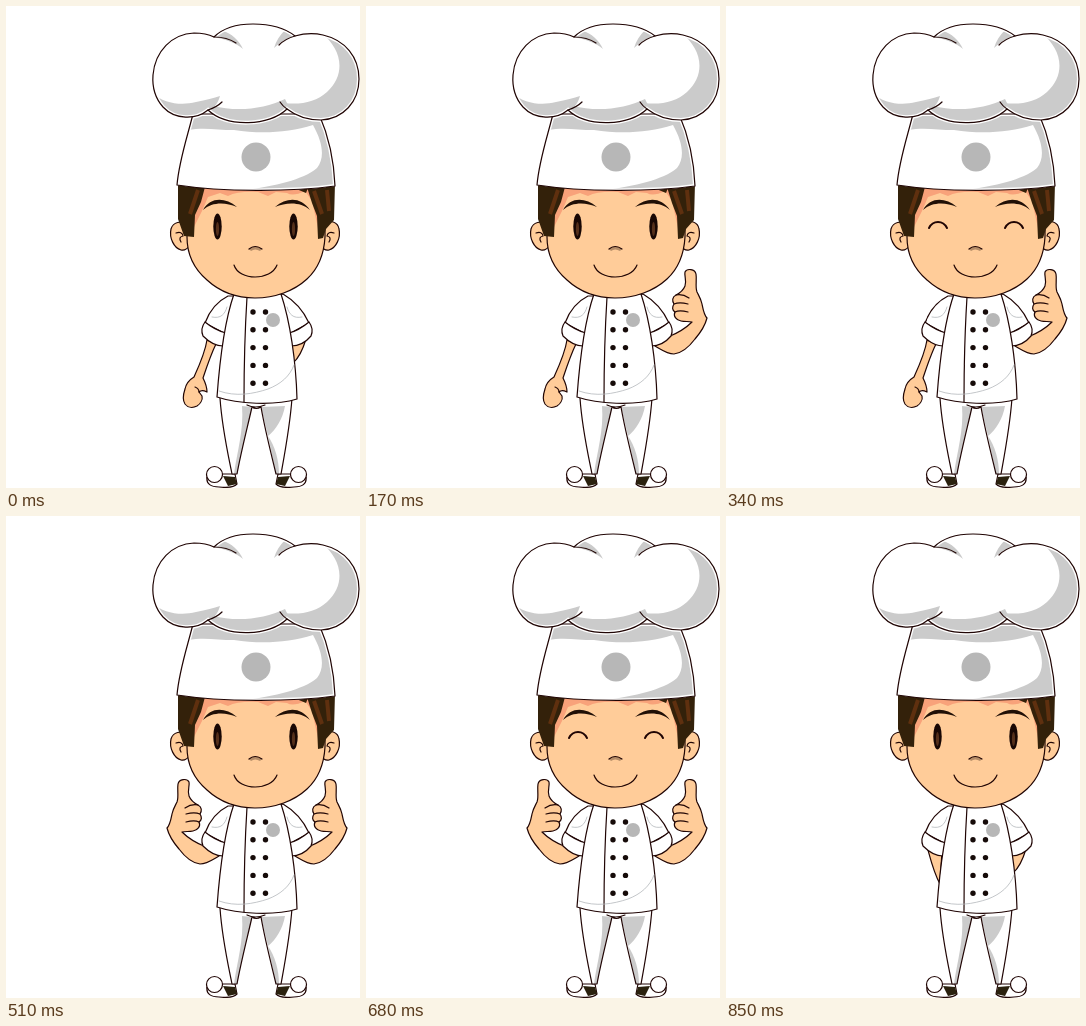
Animation of 354x482 px, one loop 1.02 s. Source, as an HTML page:

```html
<!DOCTYPE html>
<html lang="en">
<head>
<meta charset="utf-8">
<title>Thumbs-up chef</title>
<style>
  html, body { margin: 0; width: 100%; height: 100%; overflow: hidden; background: #fff; }
  svg { display: block; width: 354px; height: 482px; }
  .line { fill: none; stroke: #200504; stroke-width: 1.2; stroke-linecap: round; stroke-linejoin: round; }
  .white { fill: #fff; }
  .skin { fill: #ffcc99; }
  .shade { fill: #cbcbcb; }
  .rim { fill: none; stroke: #fff; stroke-width: 4; }
  .warm { fill: #f8a27a; }
  .hair { fill: #33210a; }
  .thin { stroke: #b4b8bb; stroke-width: .8; }
  .bold { stroke-width: 2; }
</style>
</head>
<body>
<svg viewBox="0 0 354 482" xmlns="http://www.w3.org/2000/svg">
  <defs>
    <path id="faceShape" d="M182 176 L181 231 C181 248 187 262 201 274 C213 285 230 292 249 292 C269 292 288 285 301 273 C313 262 318 248 319 231 L319 176 Z"/>
    <path id="bandShape" d="M187 108 C181 132 173 155 171 179 C216 186 285 186 329 180 C328 154 323 131 313 108 Z"/>
    <path id="puffShape" d="M202 104 C190 114 169 114 157 101 C149 92 146 82 147 69 C149 45 166 28 188 27 C196 27 202 28 208 31 C217 22 231 18 247 18 C265 18 279 22 289 30 C299 27 309 27 317 29 C339 34 353 51 353 73 C353 96 337 113 315 114 C301 114 290 110 281 103 C264 120 221 122 202 104 Z"/>
    <clipPath id="faceClip"><use href="#faceShape"/></clipPath>
    <clipPath id="bandClip"><use href="#bandShape"/></clipPath>
    <clipPath id="puffClip"><use href="#puffShape"/></clipPath>
    <g id="thumbArm">
      <path class="line skin" d="M289 340 C296 344 301 348 308 348 C316 347 323 341 329 333 C335 326 339 320 341 312 C338 309 337 303 336 298 C335 293 333 290 331 286 C329 281 331 274 330 268 C329 263 321 262 319 266 C318 270 321 275 319 280 C317 285 314 287 310 289 C306 291 306 295 308 298 C306 301 306 304 309 306 C307 310 310 314 315 315 C319 316 323 315 326 316 C321 321 312 327 302 331 Z"/>
      <path class="line" d="M308 298 C313 296 318 297 322 298 M309 306 C313 304 318 305 322 306 M310 289 C315 288 320 290 323 292"/>
    </g>
    <g id="shoe">
      <path class="line" fill="#8b8058" d="M201 471 C200 478 205 481 213 481 C221 482 228 481 231 478 L229 468 L215 468 Z"/>
      <path fill="#2a210e" d="M217 470 L229 471 L231 478 L222 480 Z"/>
      <circle class="line white" cx="208.5" cy="468.5" r="8"/>
    </g>
  </defs>

  <g id="leftBehind"><path class="line skin" d="M202 334 C205 345 208 357 214 368 L216 335 Z"/></g>
  <g id="rightBehind"><path class="line skin" d="M300 333 C297 343 294 351 287 357 L285 335 Z"/></g>
  <g id="leftDown">
    <path class="line skin" d="M201 334 C199 347 193 360 188 371 C183 374 180 378 179 383 C177 389 177 395 179 398 C182 402 187 402 191 400 C194 398 197 394 196 390 L193 386 C196 383 199 385 201 386 C201 380 199 376 197 372 C201 360 205 348 210 338 Z"/>
    <path class="line" d="M189 381 C192 382 193 384 193 386"/>
  </g>
  <g id="leftUp"><use href="#thumbArm" transform="translate(502) scale(-1 1)"/></g>
  <g id="rightUp"><use href="#thumbArm"/></g>

  <!-- legs -->
  <use href="#shoe"/>
  <use href="#shoe" transform="translate(501) scale(-1 1)"/>
  <path class="white" d="M214 392 C216 422 222 448 226 468 L231 468 C235 446 241 423 246 401 L255 401 C259 424 265 447 270 468 L275 468 C279 446 284 420 286 392 Z"/>
  <path class="shade" d="M246 401 L236 400 C238 424 231 446 228 468 L231 468 C235 446 241 423 246 401 Z M255 401 L279 400 C277 412 270 424 262 430 Z M262 430 C269 440 273 454 273 468 L270 468 Z"/>
  <path class="line" d="M214 392 C216 422 222 448 226 468 L231 468 C235 446 241 423 246 401 Q250 404 255 401 C259 424 265 447 270 468 L275 468 C279 446 284 420 286 392 M241 399 Q249 403 259 399"/>

  <!-- jacket -->
  <path class="line white" d="M222 290 C210 296 203 306 199 317 L220 328 L230 290 Z"/>
  <path class="line white" d="M277 288 C289 295 298 306 303 317 L283 328 L272 290 Z"/>
  <path class="line white" d="M199 316 C196 320 195 325 197 330 C203 336 210 340 217 340 L220 327 C212 325 205 321 199 316 Z"/>
  <path class="line white" d="M303 316 C306 320 307 325 305 330 C300 336 293 340 285 340 L283 327 C291 325 297 321 303 316 Z"/>
  <path class="line white" d="M228 288 C220 311 214 350 211 391 C232 398 268 400 291 393 C290 355 284 315 275 288 Z"/>
  <path class="line" d="M241 291 C239 323 238 358 238 396"/>
  <path class="line thin" d="M213 385 C230 391 247 388 262 383 C275 378 284 370 288 359 M206 311 C215 313 219 308 221 301 M296 311 C287 313 283 308 281 301"/>
  <g id="buttons" fill="#160b09"></g>
  <circle cx="267" cy="314" r="7" fill="#b7b7b7"/>

  <!-- head -->
  <path class="line skin" d="M182 219 C175 214 167 216 165 223 C163 232 168 242 175 244 C179 245 182 242 184 239 Z"/>
  <path class="line skin" d="M317 218 C324 213 332 216 333 223 C335 232 330 242 323 244 C319 245 316 242 315 239 Z"/>
  <path class="line" d="M170 227 Q176 225 177 230 Q172 231 175 236 M328 227 Q322 225 321 230 Q326 231 323 236"/>
  <use href="#faceShape" class="line skin"/>
  <path class="warm" clip-path="url(#faceClip)" d="M188 180 L310 180 L312 222 L306 195 L299 185 Q287 191 281 187 L270 186 L262 190 L252 186 Q232 185 222 190 L214 187 L202 191 L196 205 L188 221 Z"/>
  <path class="hair" d="M172 177 L199 181 L195 196 L189 209 L188 231 L178 230 L172 213 Z M301 181 L329 177 L328 214 L320 223 L317 232 L312 233 L311 210 L306 197 Z M288 182 L302 182 L300 187 Z"/>
  <path fill="none" stroke="#5f300f" stroke-width="4" d="M192 184 L184 208 M308 185 L316 208 M321 184 L323 205"/>
  <path fill="#200f06" d="M197 204 C204 191 219 191 231 201 C219 196 206 196 197 204 Z M269 201 C281 191 295 191 304 204 C295 196 281 196 269 201 Z"/>
  <g id="eyesOpen" fill="#180704"></g>
  <g id="eyesShut" class="line bold">
    <path d="M203 222 C207 214 217 214 221 222 M279 222 C283 214 293 214 297 222"/>
  </g>
  <path d="M243 243 Q249 237 256 243 L254 245 Q249 242 245 245 Z" fill="#b58d68"/>
  <path class="line" d="M243 243 Q249 238 256 243"/>
  <path class="line" stroke-width="1.4" d="M228 259 C233 275 265 275 271 259"/>

  <!-- hat -->
  <use href="#bandShape" class="white"/>
  <g clip-path="url(#bandClip)">
    <path class="shade" d="M180 108 L330 104 L332 188 L240 184 C268 180 297 174 311 162 C319 152 317 137 307 119 C282 127 254 128 228 124 C212 124 198 121 182 124 Z"/>
    <use href="#bandShape" class="rim"/>
    <use href="#puffShape" class="rim"/>
  </g>
  <use href="#bandShape" class="line"/>
  <circle cx="250" cy="151" r="14.5" fill="#b7b7b7"/>
  <use href="#puffShape" class="white"/>
  <g clip-path="url(#puffClip)">
    <g class="shade">
      <path d="M145 86 C157 97 174 100 190 96 C200 94 208 92 214 90 C212 97 209 101 204 104 C191 118 157 117 147 97 Z"/>
      <path d="M207 31 L217 25 C225 27 233 34 237 43 C229 36 218 33 207 31 Z"/>
      <path d="M314 26 C358 36 366 82 344 101 C327 121 292 119 278 97 C295 99 310 96 321 86 C340 69 337 43 314 26 Z"/>
      <path d="M289 30 L279 24 C274 29 270 35 268 42 C274 36 281 32 289 30 Z"/>
      <path d="M207 100 C231 106 259 103 279 93 L284 103 C265 121 220 121 202 104 Z"/>
    </g>
    <use href="#puffShape" class="rim"/>
  </g>
  <use href="#puffShape" class="line"/>
  <path class="line" d="M202 104 C208 102 212 100 216 96 M208 31 C217 31 224 33 230 37 M289 30 C282 32 277 35 273 39 M281 103 C278 101 276 99 274 96"/>
</svg>
<script>
  const $ = id => document.getElementById(id);
  const add = (parent, tag, attrs) => {
    const el = document.createElementNS("http://www.w3.org/2000/svg", tag);
    for (const key in attrs) el.setAttribute(key, attrs[key]);
    parent.appendChild(el);
  };

  for (let row = 0; row < 5; row++)
    for (const cx of [247, 259.5])
      add($("buttons"), "circle", { cx, cy: 306 + row * 17.8, r: 2.7 });

  for (const cx of [211.5, 287.5]) {
    add($("eyesOpen"), "ellipse", { cx, cy: 220.5, rx: 4.2, ry: 13 });
    add($("eyesOpen"), "ellipse", { cx, cy: 223, rx: 1.6, ry: 7, fill: "#56301b" });
  }

  const STEP = 170;
  const poses = [
    { left: "Down", right: "Behind" },
    { left: "Down", right: "Up" },
    { left: "Down", right: "Up", shut: true },
    { left: "Up", right: "Up" },
    { left: "Up", right: "Up", shut: true },
    { left: "Behind", right: "Behind" }
  ];
  const show = (id, on) => $(id).setAttribute("visibility", on ? "visible" : "hidden");

  function draw(ms) {
    const { left, right, shut } = poses[Math.floor(ms / STEP) % poses.length];
    for (const arm of ["Down", "Up", "Behind"]) show("left" + arm, left === arm);
    for (const arm of ["Up", "Behind"]) show("right" + arm, right === arm);
    show("eyesOpen", !shut);
    show("eyesShut", shut);
  }

  const start = performance.now();
  function tick() {
    draw(performance.now() - start);
    requestAnimationFrame(tick);
  }
  draw(0);
  requestAnimationFrame(tick);
</script>
</body>
</html>
```
